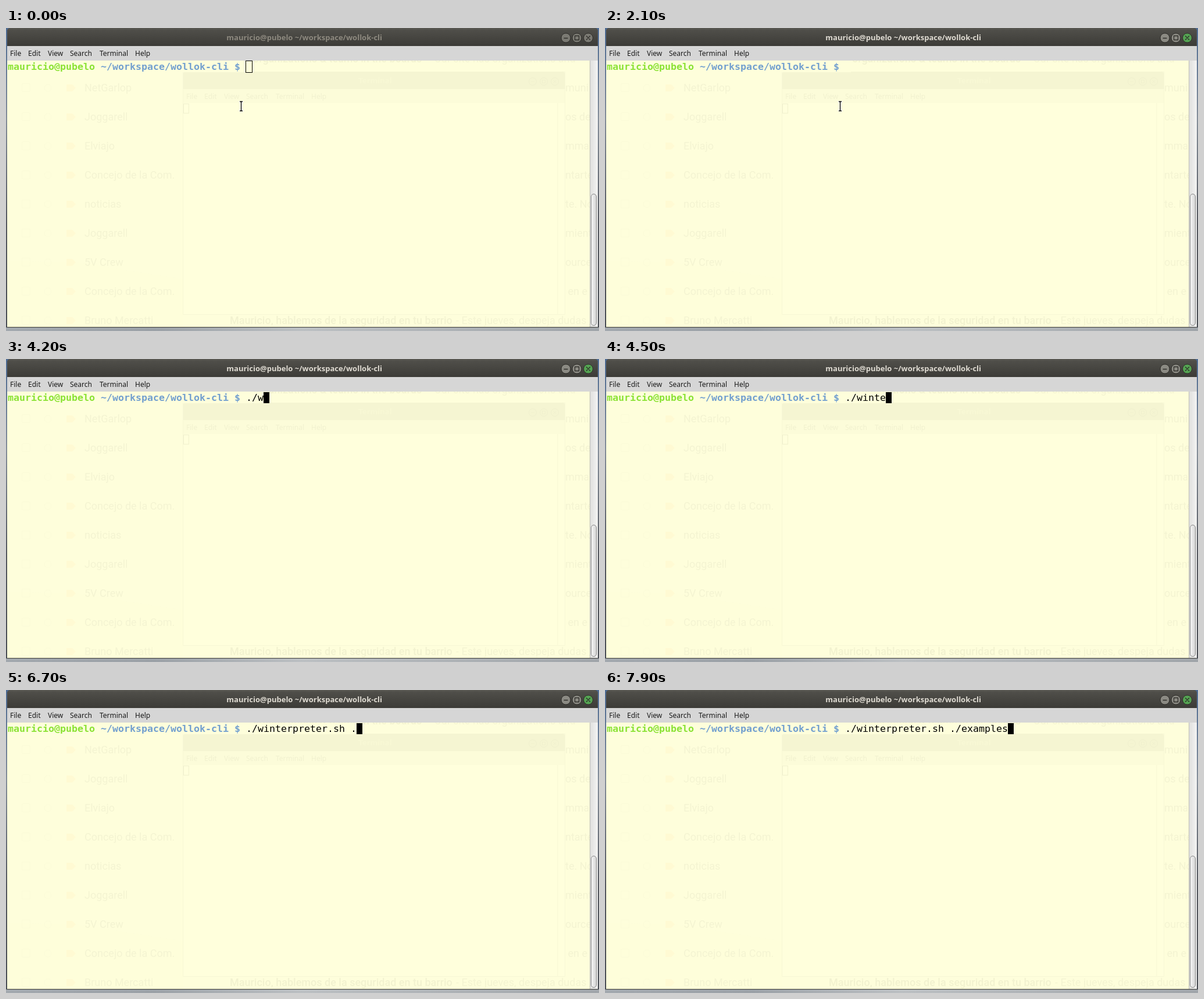
An HTML page for the animation above (8000 ms loop, 1020 px wide and 521 px high).

```html
<!DOCTYPE html>
<html lang="en">
<head>
<meta charset="utf-8">
<title>Terminal</title>
<style>
html, body { margin: 0; width: 100%; height: 100%; overflow: hidden; background: #fefedb; }
svg { display: block; position: absolute; left: 0; top: 0; }
text { white-space: pre; }
.ui { font: 12px "Noto Sans", sans-serif; }
.title { font: bold 13px "Noto Sans", sans-serif; }
.mail { font: 18px Roboto, sans-serif; fill: #f4f4d2; }
.strong { font-weight: 500; fill: #f2f2d0; }
.mono { font: 16.61px "DejaVu Sans Mono", monospace; }
.prompt { font-weight: bold; }
</style>
</head>
<body>
<svg width="1020" height="521" viewBox="0 0 1020 521">
  <defs>
    <linearGradient id="bar" x2="0" y2="1">
      <stop offset="0" stop-color="#5a5953"/>
      <stop offset=".12" stop-color="#4f4e49"/>
      <stop offset="1" stop-color="#3c3b37"/>
    </linearGradient>
    <linearGradient id="edge" x2="0" y2="1">
      <stop offset="0" stop-color="#4f6c94"/>
      <stop offset=".3" stop-color="#858e99"/>
      <stop offset=".65" stop-color="#55585f"/>
      <stop offset="1" stop-color="#4a4e55"/>
    </linearGradient>
    <linearGradient id="below">
      <stop offset="0" stop-color="#a3a9af"/>
      <stop offset=".25" stop-color="#9ba1a7"/>
      <stop offset=".5" stop-color="#bcc0c3"/>
      <stop offset="1" stop-color="#a0a5aa"/>
    </linearGradient>
    <linearGradient id="trough">
      <stop offset="0" stop-color="#dededc"/>
      <stop offset="1" stop-color="#f4f4f3"/>
    </linearGradient>
    <linearGradient id="thumb">
      <stop offset="0" stop-color="#f4f4f4"/>
      <stop offset="1" stop-color="#d6d6d6"/>
    </linearGradient>
    <clipPath id="screen"><rect x="2" y="56" width="1002" height="458"/></clipPath>
  </defs>

  <rect width="1020" height="521" fill="url(#edge)"/>
  <rect y="515" width="1020" height="6" fill="url(#below)"/>
  <path d="M2 515V6q0-6 6-6H1012q6 0 6 6V515z" fill="#3c3b37"/>
  <path d="M2 31V6q0-6 6-6H1012q6 0 6 6V31z" fill="url(#bar)"/>
  <rect x="2" y="31" width="1016" height="25" fill="#d6d6d6"/>
  <rect x="2" y="56" width="1002" height="458" fill="#fefedb"/>

  <g clip-path="url(#screen)">
    <path d="M2 400L130 404 305 432V514H2z" fill="#fbfbd6" opacity=".35"/>
    <g id="inbox"></g>
    <g id="ghost">
      <rect x="304.5" y="75.5" width="657" height="417" fill="#ffffdc" stroke="#f7f7d5"/>
      <path d="M305 105V79q0-4 4-4H957q4 0 4 4V105z" fill="#f5f5d2"/>
      <rect x="305" y="105" width="656" height="24" fill="#fcfcd9"/>
      <text class="title" x="635" y="95" text-anchor="middle" fill="#f8f8d5">Terminal</text>
      <g fill="none" stroke="#f0f0ce">
        <circle cx="906" cy="92" r="6.5"/><circle cx="925" cy="92" r="6.5"/><circle cx="944" cy="92" r="6.5"/>
        <path d="M903 92h6M922.5 89.5h5v5h-5zM941.5 89.5l5 5m0-5l-5 5"/>
        <rect x="305.5" y="130.5" width="9" height="16"/>
      </g>
      <path d="M949 129V492" stroke="#fbfbd8" stroke-width="2"/>
    </g>
    <rect id="line" x="2" y="57" height="19" fill="#fefedb"/>
    <text class="mono prompt" x="3" y="72"><tspan fill="#8ae234">mauricio@pubelo</tspan><tspan fill="#729fcf"> ~/workspace/wollok-cli $</tspan></text>
    <text class="mono" id="typed" x="413" y="72"></text>
    <rect id="block" y="57" width="10" height="19"/>
    <rect id="hollow" x="412.5" y="56.5" width="11" height="20" fill="none" stroke="#000"/>
    <g id="beam" fill="none">
      <path d="M401 127h7M404.500 127V142M401 142h7" stroke="#fff" stroke-width="3" opacity=".8"/>
      <path d="M402 126.500h5M404.500 127V142M402 142.500h5" stroke="#000" stroke-width="1.300"/>
    </g>
  </g>

  <rect x="1004" y="56" width="14" height="458" fill="url(#trough)"/>
  <path d="M1004.500 56V514" stroke="#bdbdb6"/>
  <rect x="1006.500" y="285.500" width="9" height="226" rx="4.500" fill="url(#thumb)" stroke="#888"/>

  <text class="title" id="title" x="647" y="21" text-anchor="end">mauricio@pubelo ~/workspace/wollok-cli</text>
  <g id="buttons" stroke="#2e2d29">
    <circle cx="963" cy="17" r="8"/><circle cx="982" cy="17" r="8"/><circle id="close" cx="1001.500" cy="17" r="8"/>
    <path d="M959.500 17.500h7M978.500 13.500h7v7h-7zM998 13.500l7 7m0-7l-7 7" fill="none" stroke-width="1.300"/>
  </g>
  <g id="menu"></g>
</svg>
<script>
const $ = id => document.getElementById(id);

function add(parent, tag, attrs, label) {
  const el = document.createElementNS("http://www.w3.org/2000/svg", tag);
  for (const k in attrs) el.setAttribute(k, attrs[k]);
  if (label) el.textContent = label;
  $(parent).append(el);
}

const menu = { File: 7, Edit: 38, View: 72, Search: 110, Terminal: 161, Help: 222 };
for (const name in menu) {
  add("menu", "text", { class: "ui", x: menu[name], y: 48, fill: "#1a1a1a" }, name);
  add("ghost", "text", { class: "ui", x: menu[name] + 303, y: 122, fill: "#f1f1cf" }, name);
}

const mails = [
  ["NetGarlop", "muni"], ["Joggarell", "os de"], ["Elviajo", "mman"],
  ["Concejo de la Com.", "ntarte"], ["noticias", "te. No"], ["Joggarell", "mient"],
  ["5V Crew", "ource"], ["Concejo de la Com.", " en e"], ["Bruno Mercatti", ""]
];
mails.forEach(([from, tail], i) => {
  const y = 109 + 50 * i;
  add("inbox", "rect", { x: 27.5, y: y - 13.5, width: 14, height: 14, rx: 2, fill: "none", stroke: "#fbfbd8" });
  add("inbox", "circle", { cx: 72, cy: y - 6, r: 6, fill: "none", stroke: "#fcfcd9" });
  add("inbox", "path", { d: `M104 ${y - 12}h10l6 6-6 6h-10z`, fill: "#fffad3" });
  add("inbox", "text", { class: "mail", x: 135, y }, from);
  add("inbox", "text", { class: "mail", x: 962, y }, tail);
});
add("inbox", "text", { class: "mail strong", x: 425, y: 59 }, "organizations & teams in the boards");
add("inbox", "text", { class: "mail", x: 727, y: 59 }, "- Our site has organizations and");
add("inbox", "text", { class: "mail strong", x: 385, y: 509 }, "Mauricio, hablemos de la seguridad en tu barrio");
add("inbox", "text", { class: "mail", x: 774, y: 509 }, "- Este jueves, despeja dudas");

const LOOP = 8000, CELL = 10, LEFT = 413;
const command = "./winterpreter.sh ./examples";

// [time, characters typed, cursor shown]
const steps = [
  [0, 0, 1], [1000, 0, 0], [1600, 0, 1], [2100, 0, 0],
  [3000, 2, 1], [3600, 2, 0],
  [4200, 3, 1], [4300, 4, 1], [4400, 6, 1], [4500, 7, 1],
  [5100, 7, 0], [5200, 18, 1], [5800, 18, 0], [6400, 18, 1],
  [6700, 19, 1], [6800, 20, 1], [6900, 21, 1],
  [7100, 22, 1], [7200, 23, 1], [7500, 24, 1],
  [7700, 25, 1], [7800, 27, 1], [7900, 28, 1]
];

const show = (id, on) => $(id).setAttribute("visibility", on ? "visible" : "hidden");

function draw(t) {
  const [, count, lit] = steps.findLast(s => s[0] <= t);
  const focused = t >= 400;
  const x = LEFT + count * CELL;
  $("typed").textContent = command.slice(0, count);
  $("block").setAttribute("x", x);
  $("line").setAttribute("width", x + CELL - 2);
  show("block", focused && lit);
  show("hollow", !focused);
  show("beam", t < 3000);
  $("title").setAttribute("fill", focused ? "#dfdbd2" : "#8d897f");
  $("buttons").setAttribute("fill", focused ? "#8b8a83" : "#7b7a73");
  $("close").setAttribute("fill", focused ? "#55a453" : "#7b7a73");
}

const start = performance.now();
function tick() {
  draw((performance.now() - start) % LOOP);
  requestAnimationFrame(tick);
}
tick();
</script>
</body>
</html>
```
